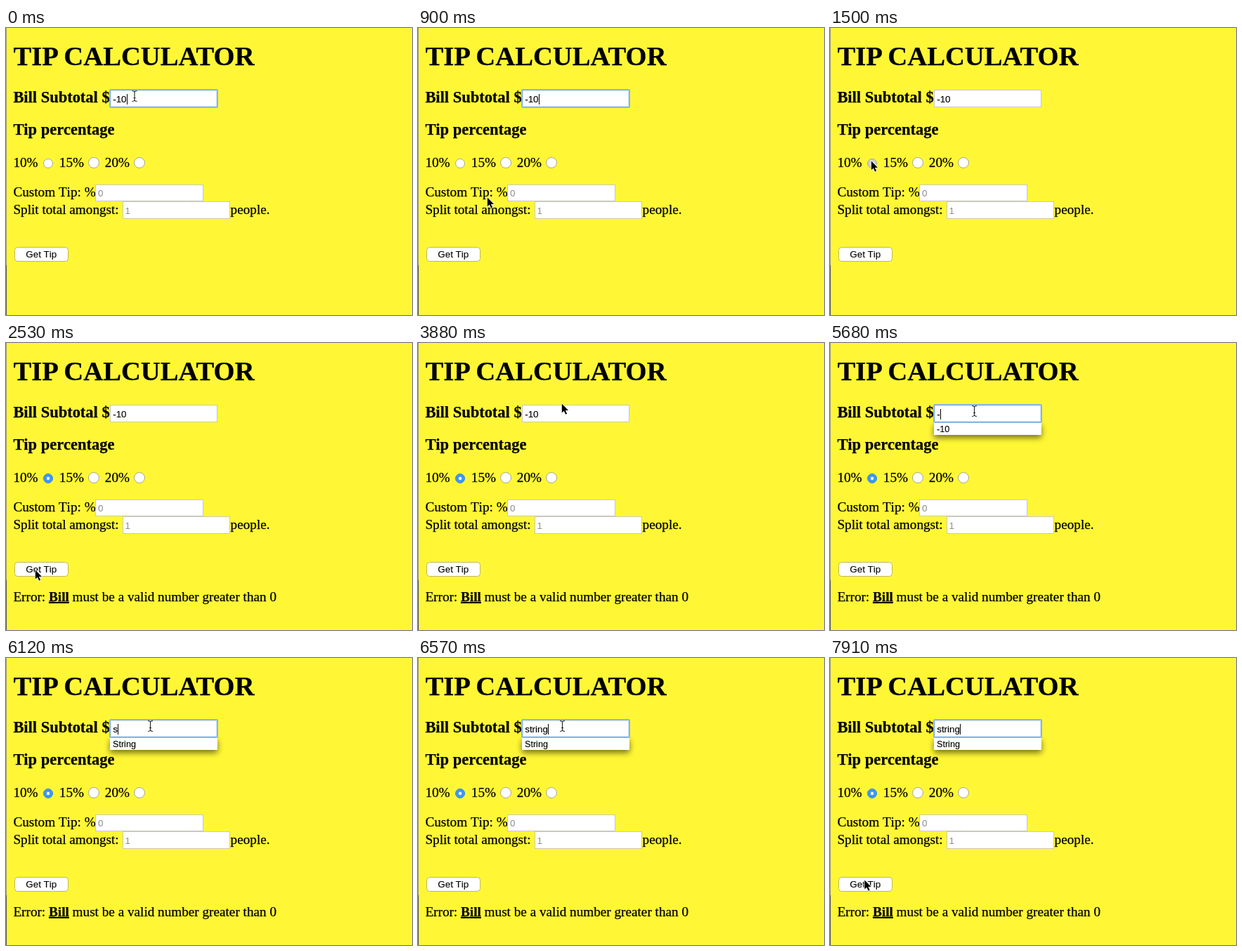
Write an HTML page that moves like this. It is 578 px wide and 409 px high and loops after 8 s.

```html
<!DOCTYPE html>
<html lang="en">
<head>
<meta charset="utf-8">
<title>Tip calculator</title>
<style>
html, body { margin: 0; width: 100%; height: 100%; overflow: hidden; background: #fff735; }
svg { display: block; width: 578px; height: 409px; }
text { font: 19.2px "Liberation Serif", serif; font-kerning: none; white-space: pre; stroke: #000; stroke-width: .25px; }
.h1 { font-size: 38.65px; font-weight: bold; font-kerning: normal; }
.h3 { font-size: 22.46px; font-weight: bold; }
.ui { font: 13.4px "Liberation Sans", sans-serif; font-kerning: none; stroke-width: .1px; }
.hint { fill: #8c8c8c; stroke: none; }
.item { font-size: 12.6px; }
.field { fill: #fff; stroke: #c9c9bd; }
.radio { fill: #fff; stroke: #aaa789; }
#menu rect { filter: drop-shadow(0 4px 4px rgba(0, 0, 0, .55)); }
</style>
</head>
<body>
<svg viewBox="0 0 578 409">
  <rect width="578" height="409" fill="#fff735"/>
  <rect width="1" height="338" fill="#9c9a78"/>
  <rect y="338" width="1" height="71" fill="#4a5060"/>

  <text class="h1" x="10.4" y="53">TIP CALCULATOR</text>
  <text class="h3" x="10.4" y="106">Bill Subtotal $</text>
  <text class="h3" x="10.4" y="152">Tip percentage</text>

  <text x="10.4" y="198">10%</text>
  <text x="75.8" y="198">15%</text>
  <text x="140.8" y="198">20%</text>
  <circle id="radio" class="radio" cx="60" cy="193" r="6.5"/>
  <circle id="dot" cx="60" cy="193" r="2.2" fill="#fff"/>
  <circle class="radio" cx="125" cy="192" r="7.5"/>
  <circle class="radio" cx="190" cy="192" r="7.5"/>

  <text x="10.4" y="240">Custom Tip: %</text>
  <rect class="field" x="127.5" y="223.5" width="153" height="23"/>
  <text class="ui hint" x="131" y="240">0</text>
  <text x="10.4" y="265">Split total amongst:</text>
  <rect class="field" x="166.5" y="247.5" width="152" height="24"/>
  <text class="ui hint" x="169.5" y="265">1</text>
  <text x="319.6" y="265">people.</text>

  <rect id="button" x="12.5" y="312.5" width="76" height="20" rx="4" stroke="#bdb660"/>
  <text class="ui" x="28.3" y="327">Get Tip</text>
  <text id="error" x="10.4" y="368">Error: <tspan font-weight="bold" text-decoration="underline">Bill</tspan> must be a valid number greater than 0</text>

  <g id="menu">
    <rect x="148" y="113" width="153" height="18" fill="#fff"/>
    <text id="item" class="ui item" x="152" y="127"/>
  </g>
  <rect class="field" x="148.5" y="88.5" width="152" height="24"/>
  <g id="ring" fill="none" stroke="#86b4ea">
    <rect x="147.5" y="87.5" width="154" height="26" rx="1"/>
    <rect x="148.5" y="88.5" width="152" height="24"/>
    <rect x="149.5" y="89.5" width="150" height="22" stroke-opacity=".3"/>
  </g>
  <rect id="selection" x="156.5" y="93" width="16" height="16" fill="#b3d5fb"/>
  <text id="value" class="ui" x="152.2" y="106"/>
  <rect id="caret" y="94" width="1" height="15"/>

  <path id="arrow" d="M.8 1.5v13l3-2.8 2.3 5 2-.9-2.2-4.9h4.1z" stroke="#fff" stroke-width="1.6" stroke-linejoin="round" paint-order="stroke"/>
  <path id="beam" d="M-3.5-7.5q3.5 0 3.5 2.5q0-2.5 3.5-2.5M0-5V5M-3.5 7.5q3.5 0 3.5-2.5q0 2.5 3.5 2.5M-1.5 2.5h3" fill="none" stroke="#222" stroke-width="1.1"/>
</svg>
<script>
const LOOP = 8000;
const el = id => document.getElementById(id);

// [time, pointer shape, x, y]
const pointer = [
  [0, "beam", 183, 97], [450, "beam", 175, 108], [600, "arrow", 150, 163],
  [750, "arrow", 118, 220], [900, "arrow", 98, 240], [1050, "arrow", 78, 224],
  [1200, "arrow", 62, 198], [1350, "arrow", 58, 188],
  [1790, "arrow", 37, 337], [2090, "arrow", 40, 326], [2240, "arrow", 41, 322],
  [2980, "arrow", 44, 316], [3130, "arrow", 62, 280], [3280, "arrow", 95, 222],
  [3430, "arrow", 135, 158], [3580, "arrow", 178, 106], [3730, "arrow", 203, 83],
  [3880, "arrow", 204, 85], [4030, "beam", 205.5, 97], [7020, "none", 0, 0],
  [7470, "arrow", 120, 200], [7620, "arrow", 40, 320], [7770, "arrow", 36, 342],
  [7910, "arrow", 48.5, 315]
];
const typing = [
  [0, "-10"], [5680, "-"], [5820, ""], [6120, "s"],
  [6270, "st"], [6420, "stri"], [6570, "string"]
];

const latest = (keys, t) => keys.findLast(k => k[0] <= t);
const show = (id, on) => el(id).setAttribute("visibility", on ? "visible" : "hidden");
const within = (t, from, to = LOOP) => t >= from && t < to;

function draw(t) {
  const value = el("value");
  value.textContent = latest(typing, t)[1];
  el("caret").setAttribute("x", Math.round(152.2 + value.getComputedTextLength()));
  el("item").textContent = t < 5820 ? "-10" : "String";

  show("ring", t < 1500 || t >= 4180);
  show("caret", t < 1500 || within(t, 4180, 4330) || within(t, 5680, 7170) || t >= 7470);
  show("selection", within(t, 4330, 5680));
  show("menu", within(t, 4480, 5820) || t >= 6120);
  show("error", t >= 2380);

  const checked = t >= 1650;
  show("dot", checked);
  el("radio").style.fill = checked ? "#3f97f6" : t >= 1500 ? "#d2d2cc" : "#fff";
  el("radio").style.stroke = checked ? "#3a88dc" : "";
  el("button").setAttribute("fill", within(t, 2240, 2380) ? "#6aaef8" : "#fff");

  const [, shape, x, y] = latest(pointer, t);
  for (const id of ["arrow", "beam"]) {
    show(id, id === shape);
    el(id).setAttribute("transform", `translate(${x} ${y})`);
  }
}

const start = performance.now();
function tick() {
  draw((performance.now() - start) % LOOP);
  requestAnimationFrame(tick);
}
tick();
</script>
</body>
</html>
```
